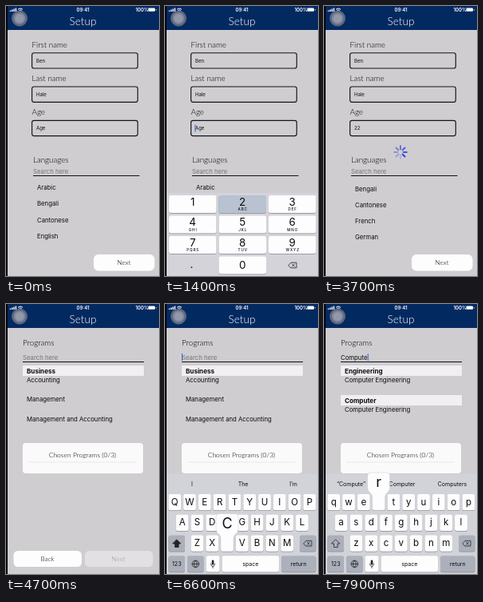
Animation of 192x338 px, one loop 8000 ms. Source, as an HTML page:

```html
<!DOCTYPE html>
<html lang="en">
<head>
<meta charset="utf-8">
<title>Setup form</title>
<style>
  html, body { margin: 0; width: 100%; height: 100%; overflow: hidden; background: #cfcdd0; }
  svg { display: block; width: 100vw; height: 100vh; }
  text { font-family: Inter, "Liberation Sans", sans-serif; font-size: 7.75px; fill: #0c0c0e; white-space: pre; }
  .thin { font-family: Lato, sans-serif; font-weight: 300; fill: #000; }
  .label { font-size: 9.8px; }
  .title { font-size: 13.6px; fill: #fff; }
  .card { font-size: 8.5px; }
  .button { font-size: 8.2px; }
  .mid { text-anchor: middle; }
  .field { font-size: 6px; }
  .bold { font-size: 8.1px; font-weight: 700; }
  .hint { fill: #77767a; }
  .off { fill: #98979c; }
  .status { font-size: 6px; font-weight: 600; fill: #fff; }
  .key { font-size: 11.5px; }
  .digit { font-size: 13.4px; }
  .tiny { font-size: 4.6px; font-weight: 500; letter-spacing: .9px; }
  .small { font-size: 7px; }
  .big { font-size: 18px; }
  .caps .key { text-transform: uppercase; }
  .icon { fill: none; stroke: #222; stroke-width: .8; stroke-linejoin: round; stroke-linecap: round; }

  #form, #programs, #keypad, #keyboard { animation: 8s linear infinite; }
  #form { animation-name: leave; }
  #programs { animation-name: enter; }
  #keypad { animation-name: keypad; }
  #keyboard { animation-name: keyboard; }
  #spinner { transform-origin: 96px 183px; animation: spin .8s steps(8) -.4s infinite; }

  @keyframes leave {
    0%, 47.5% { transform: none; animation-timing-function: cubic-bezier(.25,.8,.3,1); }
    52.5%, 100% { transform: translateX(-58px); }
  }
  @keyframes enter {
    0%, 47.5% { transform: translateX(192px); animation-timing-function: cubic-bezier(.25,.8,.3,1); }
    52.5%, 100% { transform: none; }
  }
  @keyframes keypad {
    0%, 11.9% { transform: translateY(106px); animation-timing-function: cubic-bezier(.2,.7,.3,1); }
    15.8%, 24% { transform: none; animation-timing-function: cubic-bezier(.3,.6,.3,1); }
    27.6%, 100% { transform: translateY(106px); }
  }
  @keyframes keyboard {
    0%, 78.75% { transform: translateY(126px); animation-timing-function: cubic-bezier(.2,.7,.3,1); }
    82.5%, 100% { transform: none; }
  }
  @keyframes spin { to { transform: rotate(360deg); } }
</style>
</head>
<body>
<svg viewBox="0 0 192 338" preserveAspectRatio="none">
  <rect width="192" height="338" fill="#cfcdd0"/>

  <g id="form">
    <g id="fields"></g>
    <text class="thin label" x="34" y="196">Languages</text>
    <text class="hint" x="34" y="210">Search here</text>
    <path d="M34 212.5H167.500" stroke="#111"/>
    <g id="languages"></g>
    <g id="next">
      <rect x="110" y="311" width="76.5" height="20.5" rx="6" fill="#fdfdfe"/>
      <text class="thin button mid" x="148" y="324">Next</text>
    </g>
    <g id="spinner"></g>
  </g>

  <g id="programs">
    <rect width="192" height="338" fill="#cfcdd0"/>
    <text class="thin label" x="21" y="51.5">Programs</text>
    <text id="query" x="21" y="69.5"></text>
    <rect id="queryCaret" y="62" width="1" height="9" fill="#2f62d8"/>
    <path d="M21 72.5H173" stroke="#111"/>
    <g id="results"></g>
    <rect x="21" y="174" width="151" height="38" rx="4" fill="#fbfafb"/>
    <text class="thin card mid" x="96" y="191.5">Chosen Programs (0/3)</text>
    <path d="M28 198H164" stroke="#dddce0" stroke-width=".7"/>
    <rect x="9.5" y="309" width="85.5" height="20" rx="5.5" fill="#fdfdfe"/>
    <text class="thin button mid" x="52" y="322">Back</text>
    <rect x="99" y="309" width="85.5" height="20" rx="5.5" fill="#e2e0e3"/>
    <text class="thin button off mid" x="141" y="322">Next</text>
  </g>

  <g id="header">
    <rect width="192" height="30" fill="#032961"/>
    <text class="thin title mid" x="96.5" y="23.5">Setup</text>
    <text class="status mid" x="96.5" y="6.7">09:41</text>
    <text class="status" x="162.5" y="6.7">100%</text>
    <path d="M5.5 7V5.5M7.8 7V4.5M10.1 7V3.5M12.4 7V2.5" stroke="#fff" stroke-width="1.4"/>
    <path d="M15 4.3Q18 1.5 21 4.3M16.3 5.7Q18 4.2 19.7 5.7" fill="none" stroke="#fff"/>
    <circle cx="18" cy="6.8" r=".6" fill="#fff"/>
    <rect x="178.5" y="2.6" width="8.5" height="4.2" rx="1" fill="#fff"/>
    <path d="M188.3 4V5.5" stroke="#fff" stroke-width=".8"/>
    <circle cx="17" cy="15.5" r="10" fill="#5d6780"/>
    <circle cx="17" cy="15.5" r="7.3" fill="#7d869a"/>
    <circle cx="17" cy="15.5" r="5.3" fill="#9298a8"/>
  </g>
  <rect width="2" height="338" fill="#050507"/>

  <g id="keypad"><rect x="2" y="234" width="190" height="104" fill="#d4d3da"/></g>
  <g id="keyboard"><rect x="2" y="213" width="190" height="125" fill="#d2d3d9"/></g>
</svg>

<script>
const LOOP = 8000;
const $ = id => document.getElementById(id);

function add(parent, tag, attrs, text) {
  const node = document.createElementNS("http://www.w3.org/2000/svg", tag);
  for (const name in attrs) node.setAttribute(name, attrs[name]);
  if (text !== undefined) node.textContent = text;
  parent.append(node);
  return node;
}
const write = (parent, x, y, text, cls = "") => add(parent, "text", { x, y, class: cls }, text);

function cap(parent, x, y, width, height, fill = "#fdfdfe") {
  add(parent, "rect", { x, y: y + .8, width, height, rx: 2.5, fill: "#8b8d94" });
  return add(parent, "rect", { x, y, width, height, rx: 2.5, fill });
}

// Latest value whose start time has passed
const at = (steps, t) => steps.reduce((value, [start, next]) => t >= start ? next : value, steps[0][1]);
const within = (t, from, to) => t >= from && t < to;
const show = (node, on) => node.style.display = on ? "" : "none";

// Form fields
const fields = [["First name", "Ben"], ["Last name", "Hale"], ["Age", "Age"]].map(([label, value], i) => {
  const y = 58.7 + i * 42.3;
  write($("fields"), 32.5, y - 7, label, "thin label");
  add($("fields"), "rect", { x: 32.6, y, width: 132.7, height: 19.3, rx: 2.5, fill: "none", stroke: "#141416", "stroke-width": 1.15 });
  return write($("fields"), 38, y + 12, value, "field");
});
const age = fields[2];
const ageCaret = add($("fields"), "rect", { y: 148.5, width: 1, height: 9, fill: "#2f62d8" });
const rows = [0, 1, 2, 3].map(i => write($("languages"), 39, 230.2 + i * 20.2, ""));

for (let i = 0; i < 8; i++) {
  add($("spinner"), "path", {
    d: "M96 179.2V175.3", stroke: "#303fe0", "stroke-width": 2.1, "stroke-linecap": "round",
    opacity: .2 + i * .11, transform: `rotate(${i * 45} 96 183)`
  });
}

const backspace = (parent, x, y) => add(parent, "path", {
  class: "icon",
  d: `M${x - 5} ${y}l3-3.3h7v6.6h-7zM${x - .5} ${y - 1.5}l3 3m0-3l-3 3`
});

// Number pad
const letters = ["", "ABC", "DEF", "GHI", "JKL", "MNO", "PQRS", "TUV", "WXYZ"];
let twoKey;
letters.forEach((text, i) => {
  const x = 5 + i % 3 * 62.5, y = 237 + Math.floor(i / 3) * 25.5;
  const key = cap($("keypad"), x, y, 59.5, 22);
  if (i === 1) twoKey = key;
  write($("keypad"), x + 29.7, y + 12.7, i + 1, "digit mid");
  write($("keypad"), x + 30.2, y + 19.3, text, "tiny mid");
});
cap($("keypad"), 67.5, 313.5, 59.5, 22);
write($("keypad"), 97.2, 329.3, "0", "digit mid");
write($("keypad"), 33.5, 328, ".", "digit mid");
backspace($("keypad"), 160, 324.5);

// Letter keyboard
const board = $("keyboard"), GRAY = "#abb0bb", places = {};
const hints = [34, 98, 161].map(x => write(board, x, 228.3, "", "small mid"));
[["qwertyuiop", 12.2, 238], ["asdfghjkl", 21.6, 263.7], ["zxcvbnm", 40.4, 289.5]].forEach(([chars, left, y]) => {
  [...chars].forEach((char, i) => {
    const x = left + i * 18.8;
    cap(board, x - 7.9, y, 15.8, 20.3);
    write(board, x, y + 13.6, char, "key mid");
    places[char] = [x, y];
  });
});
cap(board, 4.5, 289.5, 20.5, 20.3, GRAY);
const shift = add(board, "path", { class: "icon", d: "M14.8 295l5 5h-2.7v4.5h-4.6V300h-2.7z" });
cap(board, 169, 289.5, 20.5, 20.3, GRAY);
backspace(board, 179, 299.7);
[[4.5, 20.5, "123", GRAY], [28, 20.5, "", GRAY], [51.5, 17, ""], [71.5, 71.5, "space"], [146, 43.5, "return", GRAY]]
  .forEach(([x, width, text, fill]) => {
    cap(board, x, 315.2, width, 20.3, fill);
    write(board, x + width / 2, 328, text, "small mid");
  });
add(board, "path", {
  class: "icon",
  d: "M34 325.4a4.3 4.3 0 1 0 8.6 0a4.3 4.3 0 1 0-8.6 0h8.6M38.3 321.1q-4 4.3 0 8.6q4-4.3 0-8.6"
});
add(board, "path", { class: "icon", d: "M57.5 325q0 3.5 2.5 3.5t2.5-3.5M60 328.5v2" });
add(board, "rect", { x: 58.7, y: 320.5, width: 2.6, height: 6, rx: 1.3, fill: "#222" });

const popup = add(board, "g", {});
add(popup, "path", {
  d: "M-10-27H10Q14-27 14-23V-8Q14-4 10-1Q8 1 8 4V18Q8 20.3 5.5 20.3H-5.5Q-8 20.3-8 18V4Q-8 1-10-1Q-14-4-14-8V-23Q-14-27-10-27Z",
  fill: "#fdfdfe", stroke: "#b9bbc2", "stroke-width": .4
});
const popupChar = write(popup, 0, -9, "", "big mid");

// Timelines
const ages = [[0, ""], [1480, "2"], [1680, "22"]];
const languages = [
  [0, ["Arabic", "Bengali", "Cantonese", "English"]],
  [2750, ["Bengali", "Cantonese", "English", "French"]],
  [3250, ["Bengali", "Cantonese", "French", "German"]]
];
const queries = [
  [0, ""], [6680, "C"], [6920, "Co"], [7180, "Com"], [7380, "Comp"],
  [7540, "Compu"], [7690, "Comput"], [7820, "Compute"], [LOOP, "Computer"]
];
const suggestions = [
  [0, ["I", "The", "I’m"]], [6680, ["“C”", "Can", "Could"]], [6920, ["“Co”", "Come", "Coming"]],
  [7180, ["“Com”", "Come", "Coming"]], [7380, ["“Comp”", "Company", "Complete"]],
  [7540, ["“Compu”", "Computer", "Computers"]], [7690, ["“Comput”", "Computer", "Computers"]],
  [7820, ["“Compute”", "Computer", "Computers"]]
];
// Entries starting with # are section titles
const results = [
  [0, [["#Business", 86.5], ["Accounting", 97.5], ["Management", 122], ["Management and Accounting", 147]]],
  [6920, [["#Business", 86.5], ["Commerce", 97.5], ["#Statistics", 123.5],
    ["Bioinformatics and Computational", 134.5], ["Biology", 144.7]]],
  [7380, [["#Engineering", 86.5], ["Computer Engineering", 97.5], ["#Computer", 123.5], ["Computer Engineering", 134.5]]]
];

let shown;
function drawResults(list) {
  if (list === shown) return;
  shown = list;
  $("results").replaceChildren();
  for (const [text, y] of list) {
    const title = text[0] === "#";
    if (title) add($("results"), "rect", { x: 21, y: y - 9.5, width: 152, height: 13, fill: "#f2eff2" });
    write($("results"), 26, y, title ? text.slice(1) : text, title ? "bold" : "");
  }
}

function drawPopup(t) {
  const i = queries.findIndex(([time]) => within(t, time - 120, time + 20));
  show(popup, i > 0);
  if (i < 1) return;
  const char = queries[i][1].at(-1), [x, y] = places[char.toLowerCase()];
  popup.setAttribute("transform", `translate(${x} ${y})`);
  popupChar.textContent = char;
}

function render(t) {
  const typed = at(ages, t);
  age.textContent = typed || "Age";
  show(ageCaret, within(t, 850, 1950));
  ageCaret.setAttribute("x", 37.5 + (typed ? age.getComputedTextLength() + .8 : 0));
  twoKey.setAttribute("fill", within(t, 1370, 1480) || within(t, 1580, 1680) ? "#b8c2d1" : "#fdfdfe");

  at(languages, t).forEach((name, i) => rows[i].textContent = name);
  $("languages").setAttribute("transform", `translate(0 ${t >= 3250 ? 1.5 : 0})`);
  $("next").setAttribute("opacity", within(t, 3480, 3640) ? .4 : 1);
  show($("spinner"), within(t, 3620, 4200));

  const query = at(queries, t), box = $("query");
  box.textContent = query || "Search here";
  box.classList.toggle("hint", !query);
  show($("queryCaret"), t >= 6300);
  $("queryCaret").setAttribute("x", 21 + (query ? box.getComputedTextLength() + .3 : 0));

  board.classList.toggle("caps", !query);
  shift.style.fill = query ? "none" : "#222";
  at(suggestions, t).forEach((word, i) => hints[i].textContent = word);
  drawResults(at(results, t));
  drawPopup(t);
}

let start;
function tick(now) {
  start ??= now;
  render((now - start) % LOOP);
  requestAnimationFrame(tick);
}
render(0);
requestAnimationFrame(tick);
</script>
</body>
</html>
```
